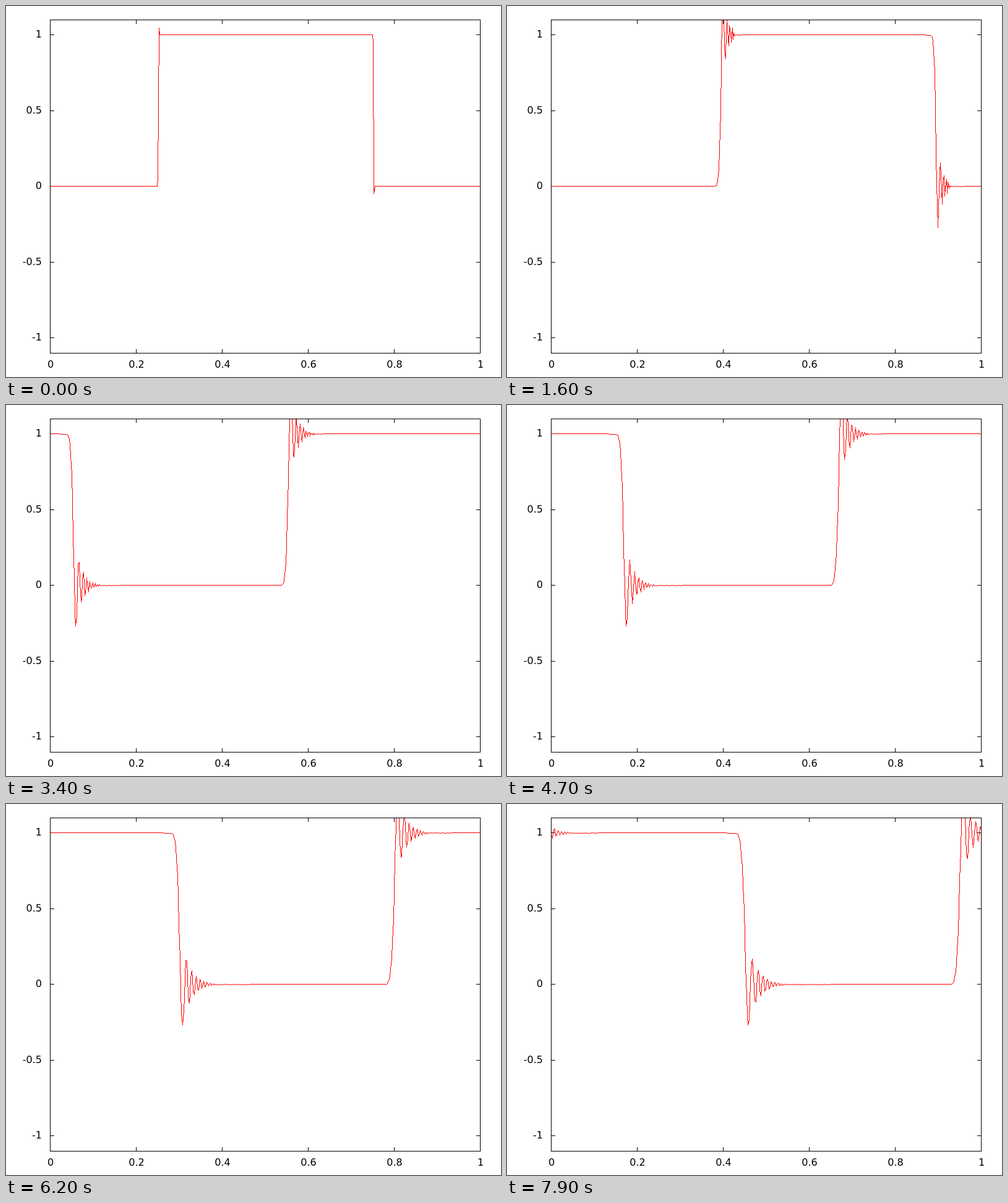
Animation of 800x600 px, one loop 8000 ms. Source, as an HTML page:

```html
<!DOCTYPE html>
<html lang="en">
<head>
<meta charset="utf-8">
<title>Square wave advection</title>
<style>
  html, body { margin: 0; width: 100%; height: 100%; overflow: hidden; background: #fff; }
  svg { display: block; }
  text { font: 16px "DejaVu Sans", sans-serif; fill: #000; }
</style>
</head>
<body>
<svg width="800" height="600" viewBox="0 0 800 600">
  <g shape-rendering="crispEdges">
    <path id="ticks" fill="none" stroke="#000"/>
    <path id="curve" fill="#f00"/>
    <rect x="71.5" y="22.5" width="695" height="539" fill="none" stroke="#000"/>
  </g>
  <g id="labels"></g>
</svg>
<script>
const LEFT = 71, RIGHT = 766, TOP = 22, BOTTOM = 561;
const CELLS = 512, COURANT = 0.9, STEPS_PER_FRAME = 5;
const FRAMES = 80, FRAME_MS = 100;

const pixelX = x => Math.floor(LEFT + (RIGHT - LEFT) * x + 0.5);
const pixelY = u => BOTTOM - Math.floor((u + 1.1) * 245 + 0.5);

// One Beam-Warming step of the advection equation on a periodic grid.
const C0 = (1 - COURANT) * (2 - COURANT) / 2;
const C1 = COURANT * (2 - COURANT);
const C2 = COURANT * (COURANT - 1) / 2;
function advance(u) {
  return u.map((v, j) =>
    C0 * v + C1 * u[(j + CELLS - 1) % CELLS] + C2 * u[(j + CELLS - 2) % CELLS]);
}

// Aliased line as one-pixel squares, clipped at the top of the plot.
function linePixels(x0, y0, x1, y1) {
  const dx = Math.abs(x1 - x0), dy = Math.abs(y1 - y0);
  const steep = dy > dx;
  if (steep ? y0 > y1 : x0 > x1) [x0, y0, x1, y1] = [x1, y1, x0, y0];
  const major = Math.max(dx, dy), minor = Math.min(dx, dy);
  const sign = Math.sign(steep ? x1 - x0 : y1 - y0);
  let d = "";
  for (let k = 0; k <= major; k++) {
    const side = major ? sign * Math.floor((2 * k * minor + major) / (2 * major)) : 0;
    const x = x0 + (steep ? side : k), y = y0 + (steep ? k : side);
    if (y >= TOP) d += `M${x} ${y}h1v1h-1z`;
  }
  return d;
}

function curvePath(u) {
  const points = u.map((v, j) =>
    [pixelX((j + 0.5) / CELLS), pixelY(Number(v.toPrecision(6)))]);
  let d = "";
  for (let j = 1; j < CELLS; j++) d += linePixels(...points[j - 1], ...points[j]);
  return d;
}

function buildFrames() {
  let u = Array.from({ length: CELLS }, (_, j) =>
    j >= CELLS / 4 && j < CELLS * 3 / 4 ? 1 : 0);
  u = advance(u);
  const paths = [];
  for (let i = 0; i < FRAMES; i++) {
    paths.push(curvePath(u));
    for (let s = 0; s < STEPS_PER_FRAME; s++) u = advance(u);
  }
  return paths;
}

function drawAxes() {
  let d = "", labels = "";
  const label = (x, y, anchor, value) =>
    labels += `<text x="${x}" y="${y}" text-anchor="${anchor}">${value}</text>`;
  for (const x of [0, 0.2, 0.4, 0.6, 0.8, 1]) {
    const px = pixelX(x);
    d += `M${px + 0.5} ${TOP}v7M${px + 0.5} ${BOTTOM + 1}v-7`;
    label(px + 1, 585, "middle", x);
  }
  for (const y of [-1, -0.5, 0, 0.5, 1]) {
    const py = pixelY(y);
    d += `M${LEFT} ${py + 0.5}h7M${RIGHT + 1} ${py + 0.5}h-7`;
    label(58, py + 5, "end", y);
  }
  document.getElementById("ticks").setAttribute("d", d);
  document.getElementById("labels").innerHTML = labels;
}

const curve = document.getElementById("curve");
const frames = buildFrames();
let shown = -1;

function render(time) {
  const index = Math.floor(Math.max(0, time) / FRAME_MS) % FRAMES;
  if (index !== shown) curve.setAttribute("d", frames[shown = index]);
}

drawAxes();
render(0);
const start = performance.now();
(function tick() {
  render(performance.now() - start);
  requestAnimationFrame(tick);
})();
</script>
</body>
</html>
```
